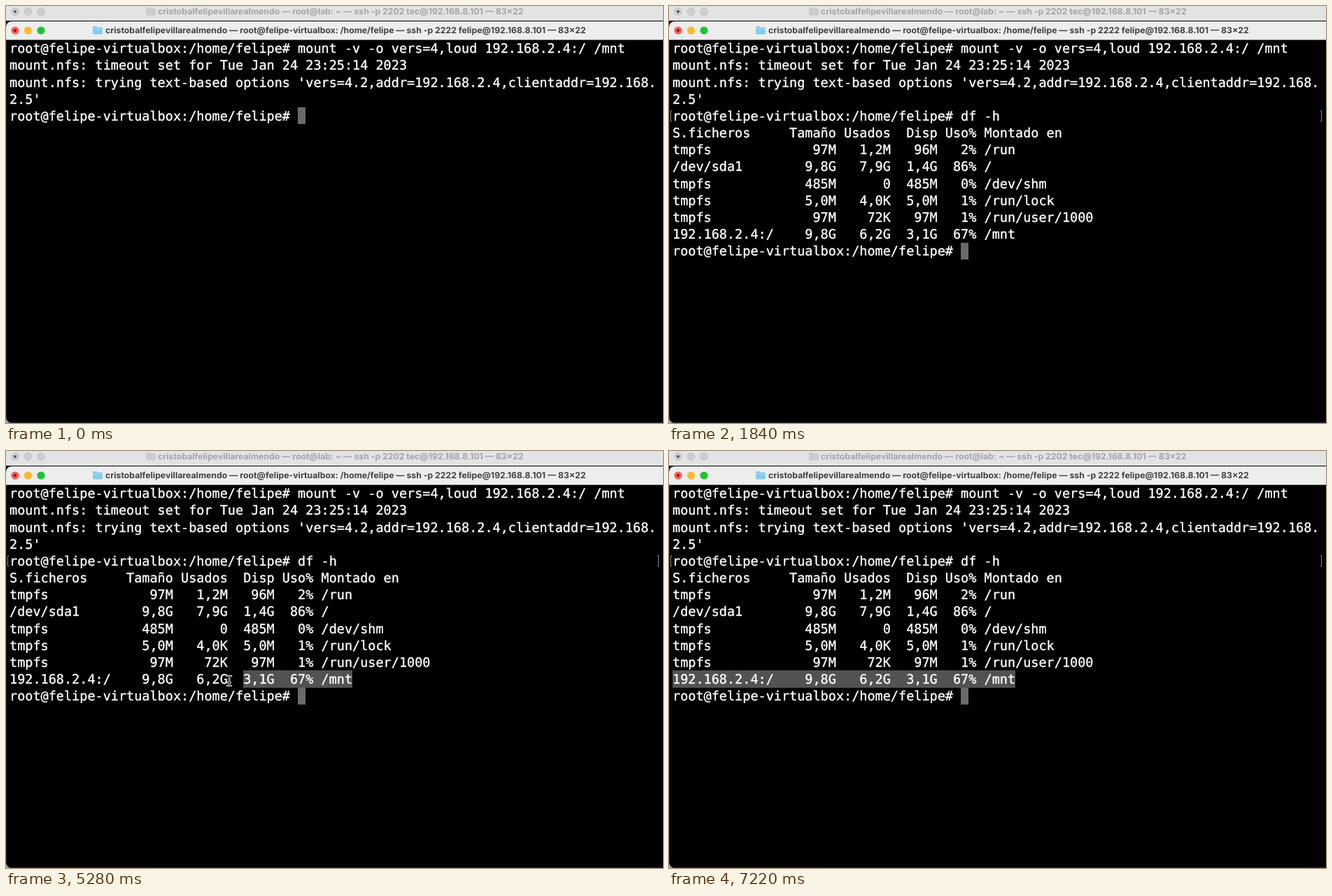
An HTML page for the animation above (8 s loop, 939 by 597 pixels).

```html
<!DOCTYPE html>
<html lang="es">
<head>
<meta charset="utf-8">
<title>Terminal</title>
<style>
  html, body { margin: 0; width: 100%; height: 100%; overflow: hidden; background: #000; }
  svg { display: block; width: 100%; height: 100%; }
  text { white-space: pre; text-rendering: geometricPrecision; }
  .term text {
    font: 18.5px "DejaVu Sans Mono", "Liberation Mono", monospace;
    fill: #fff; stroke: #fff; stroke-width: .35px;
  }
  .title { font: 700 12.26px Inter, Roboto, sans-serif; }
</style>
</head>
<body>
<svg viewBox="0 0 939 597" preserveAspectRatio="none">
  <defs>
    <path id="folder" d="M0 2.2Q0 .5 1.7.5H5L6.5 2H12.6Q14 2 14 3.4V10.3Q14 12 12.3 12H1.7Q0 12 0 10.3Z"/>
    <path id="beamLine" d="M-3-7Q0-7 0-5V5Q0 7-3 7M3-7Q0-7 0-5M3 7Q0 7 0 5M-1.8 2.5H1.8"/>
    <g id="beam" fill="none" stroke-linecap="round">
      <use href="#beamLine" stroke="#fff" stroke-width="2.6"/>
      <use href="#beamLine" stroke="#111" stroke-width="1"/>
    </g>
    <path id="resize" d="M-7 0L-3-3.6V-1.4H3V-3.6L7 0L3 3.6V1.4H-3V3.6Z" fill="#000" stroke="#fff" stroke-width="1.1" stroke-linejoin="round"/>
  </defs>

  <rect width="939" height="597" fill="#000"/>
  <rect width="939" height="21" fill="#e2e3e3"/>
  <g fill="#cdcdcd" stroke="#bdbdbd" stroke-width=".7">
    <circle cx="13" cy="8" r="5.5"/><circle cx="31.5" cy="8" r="5.5"/><circle cx="50" cy="8" r="5.5"/>
  </g>
  <circle cx="13" cy="8" r="2" fill="#555"/>
  <use href="#folder" x="200" y="1.5" fill="#cbcccc"/>
  <text class="title" x="217" y="12.3" fill="#a5a5a5">cristobalfelipevillarealmendo — root@lab: ~ — ssh -p 2202 tec@192.168.8.101 — 83×22</text>

  <path d="M0 48.5V31Q0 22 9 22H939V48.5Z" fill="#ededed"/>
  <circle cx="13" cy="35" r="5.6" fill="#fe5b52"/>
  <circle cx="13" cy="35" r="2" fill="#7a0d08"/>
  <circle cx="31.5" cy="35" r="5.6" fill="#fdb92c"/>
  <circle cx="50" cy="35" r="5.6" fill="#1fc332"/>
  <use href="#folder" x="124" y="28.5" fill="#84cdee"/>
  <path d="M124 33H138" stroke="#a9def6" stroke-width="1"/>
  <text class="title" x="142" y="39.3" fill="#424242">cristobalfelipevillarealmendo — root@felipe-virtualbox: /home/felipe — ssh -p 2222 felipe@192.168.8.101 — 83×22</text>
  <path d="M.3 48.5V589Q.3 596.6 8 596.6H939" fill="none" stroke="#444" stroke-width=".7"/>
  <path d="M0 590V597H7Q1.5 596 0 590Z" fill="#aaa"/>

  <g class="term">
    <rect id="selection" fill="#525252"/>
    <rect id="caret" fill="#6a6a6a"/>
    <g id="lines"></g>
    <path id="marks" d="M4.5 150H2.5V165H4.5M930.5 150H932.5V165H930.5" fill="none" stroke="#8a8a8a" stroke-width="1"/>
  </g>
  <use id="pointer" href="#beam"/>
</svg>
<script>
const LOOP = 8000, LEFT = 5, TOP = 48.5, COL = 11.138, ROW = 24.17;
const OUTPUT_AT = 1840, POINTER_AT = 4090, POINTER_STEP = 148.3;
const PROMPT = 'root@felipe-virtualbox:/home/felipe# ';
const COMMAND = 'df -h';
const KEY_TIMES = [500, 650, 800, 1250, 1700];

const intro = [
  PROMPT + 'mount -v -o vers=4,loud 192.168.2.4:/ /mnt',
  'mount.nfs: timeout set for Tue Jan 24 23:25:14 2023',
  "mount.nfs: trying text-based options 'vers=4.2,addr=192.168.2.4,clientaddr=192.168.",
  "2.5'"
];
const tableRow = ([name, size, used, free, percent, mount]) =>
  name.padEnd(14) + size.padStart(7) + used.padStart(7) +
  free.padStart(6) + percent.padStart(5) + ' ' + mount;
const table = [
  'S.ficheros|Tamaño|Usados|Disp|Uso%|Montado en',
  'tmpfs|97M|1,2M|96M|2%|/run',
  '/dev/sda1|9,8G|7,9G|1,4G|86%|/',
  'tmpfs|485M|0|485M|0%|/dev/shm',
  'tmpfs|5,0M|4,0K|5,0M|1%|/run/lock',
  'tmpfs|97M|72K|97M|1%|/run/user/1000',
  '192.168.2.4:/|9,8G|6,2G|3,1G|67%|/mnt'
].map(line => tableRow(line.split('|')));

// Pointer x, y and first selected column at each step
const SELECT_ROW = 11, SELECT_END = 44;
const path = [
  [903.5, 288.5, 44], [800, 325, 44], [640, 350, 44], [545, 345, 44],
  [510, 332, 44], [505, 330, 44], [490, 329, 44], [380, 329, 42],
  [319, 329, 30], [240, 327, 23], [160, 324, 15], [85, 320, 9],
  [33, 318, 4], [22, 318, 2], [15, 319, 1], [11, 320, 1],
  [6, 322, 0], [40, 360, 0], [230, 410, 0], [560, 434, 0], [902, 420, 0]
];

const byId = id => document.getElementById(id);
const show = (node, on) => node.setAttribute('visibility', on ? 'visible' : 'hidden');
const place = (node, attrs) => {
  for (const name in attrs) node.setAttribute(name, attrs[name]);
};
const colX = col => LEFT + col * COL;
const rowY = row => TOP + row * ROW;
const selection = byId('selection'), caret = byId('caret');
const marks = byId('marks'), pointer = byId('pointer');

// Cell blocks sit on whole pixels
function placeCells(node, row, from, to) {
  const x = Math.round(colX(from)), y = Math.round(rowY(row));
  place(node, { x, y, width: Math.round(colX(to)) - x, height: Math.round(rowY(row + 1)) - y });
}

const rows = Array.from({ length: 13 }, (_, row) => {
  const node = document.createElementNS('http://www.w3.org/2000/svg', 'text');
  place(node, { x: LEFT, y: rowY(row) + 18.8 });
  byId('lines').append(node);
  return node;
});

function render(t) {
  const done = t >= OUTPUT_AT;
  const typed = COMMAND.slice(0, KEY_TIMES.filter(at => t >= at).length);
  const screen = [...intro, PROMPT + typed, ...(done ? [...table, PROMPT] : [])];
  rows.forEach((node, row) => {
    const line = screen[row] || '';
    if (node.textContent !== line) node.textContent = line;
  });
  const last = screen.length - 1, column = screen[last].length;
  placeCells(caret, last, column, column + 1);
  show(marks, done);

  const step = Math.floor((t - POINTER_AT) / POINTER_STEP);
  const [x, y, from] = path[Math.min(Math.max(step, 0), path.length - 1)];
  show(pointer, step >= 0 && step < path.length);
  place(pointer, { x, y, href: step > 0 ? '#beam' : '#resize' });
  show(selection, step >= 0 && from < SELECT_END);
  placeCells(selection, SELECT_ROW, from, SELECT_END);
}

const start = performance.now();
function tick() {
  render((performance.now() - start) % LOOP);
  requestAnimationFrame(tick);
}
tick();
</script>
</body>
</html>
```
